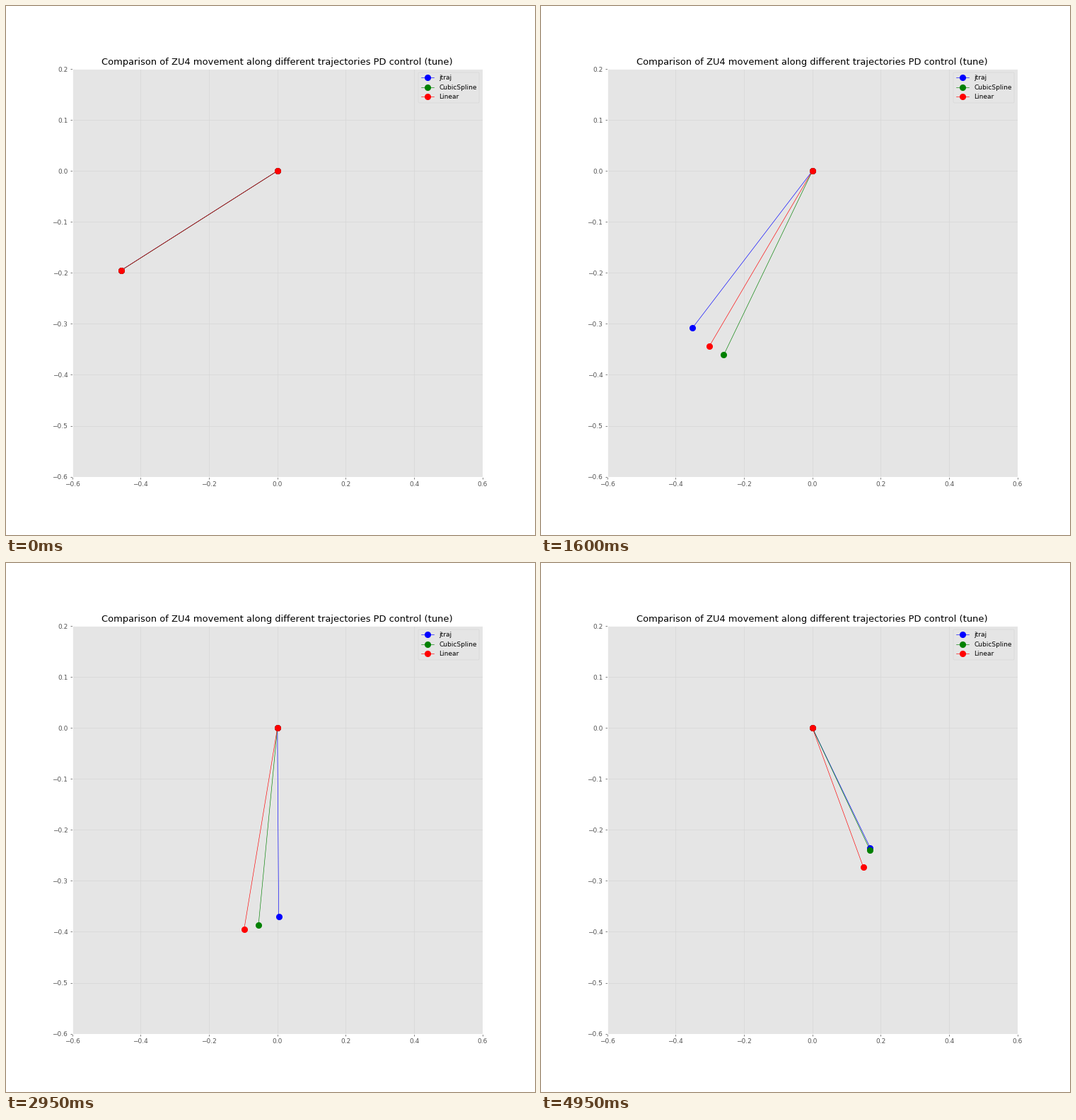
These frames come from a looping animation (748x748 px, 5000 ms). A matplotlib script:

```python
import numpy as np
import matplotlib.pyplot as plt
from matplotlib.animation import FuncAnimation

SIZE, DPI = 748, 65
FRAMES, INTERVAL = 100, 50
START_ANGLE, START_REACH = 23.09, 0.4963

plt.rcParams.update({
    "font.family": "DejaVu Sans",
    "font.size": 10,
    "text.kerning_factor": 6,
    "axes.facecolor": "#E5E5E5",
    "axes.edgecolor": "white",
    "axes.linewidth": 1,
    "axes.titlesize": 14.4,
    "axes.titlepad": 7,
    "axes.axisbelow": True,
    "xtick.color": "#555555",
    "ytick.color": "#555555",
    "patch.linewidth": 0.5,
})


def quintic(t):
    return t**3 * (10 - 15 * t + 6 * t**2)


def lagged(i, lag):
    """Follow a constant-speed command from rest, a fixed delay behind."""
    return i - lag * np.tanh(i / lag)


def tip(s, angle, reach):
    """Arm tip at progress s; the angle leaves its start value softly."""
    rise = np.polynomial.polynomial.polyval(s, angle) - START_ANGLE
    theta = np.radians(START_ANGLE + (rise + np.hypot(rise, 0.25)) / 2)
    r1, r2 = reach
    r = START_REACH - s * (r1 + r2 * s)
    return -r * np.cos(theta), -r * np.sin(theta)


steps = np.arange(FRAMES)
last = FRAMES - 1
arms = [
    ("jtraj", "blue",
     tip(quintic(steps / last), (22.2, 96.5, 7.0), (0.143, 0.064))),
    ("CubicSpline", "green",
     tip(steps / last, (22.8, 96.2, 3.0, 3.1), (0.140, 0.064))),
    ("Linear", "red",
     tip(lagged(steps, 5.6) / last, (22.5, 98.1, 0.6, 3.6), (0.128, 0.072))),
]

side = (SIZE + 1e-6) / DPI
fig = plt.figure(figsize=(side, side), dpi=DPI, facecolor="white")
# The layout belongs to an 11.52 inch page, cropped to whole pixels.
page = 11.52 * DPI / SIZE
ax = fig.add_axes([page * v for v in (0.125, 0.11, 0.775, 0.77)])
ax.set_xlim(-0.6, 0.6)
ax.set_ylim(-0.6, 0.2)
ax.set_xticks(np.linspace(-0.6, 0.6, 7))
ax.set_yticks(np.linspace(-0.6, 0.2, 9))
ax.grid(True, color="#D7D7D7", linewidth=0.8)
ax.set_title("Comparison of ZU4 movement along different trajectories"
             " PD control (tune)")

lines = [ax.plot([], [], "o-", color=color, lw=0.7, ms=9, label=name)[0]
         for name, color, _ in arms]
ax.legend(loc="upper right")


def draw(i):
    for line, (_, _, (x, y)) in zip(lines, arms):
        line.set_data([0, x[i]], [0, y[i]])
    return lines


anim = FuncAnimation(fig, draw, frames=FRAMES, interval=INTERVAL,
                     init_func=lambda: draw(0), repeat=True, repeat_delay=0)
plt.show()
```
